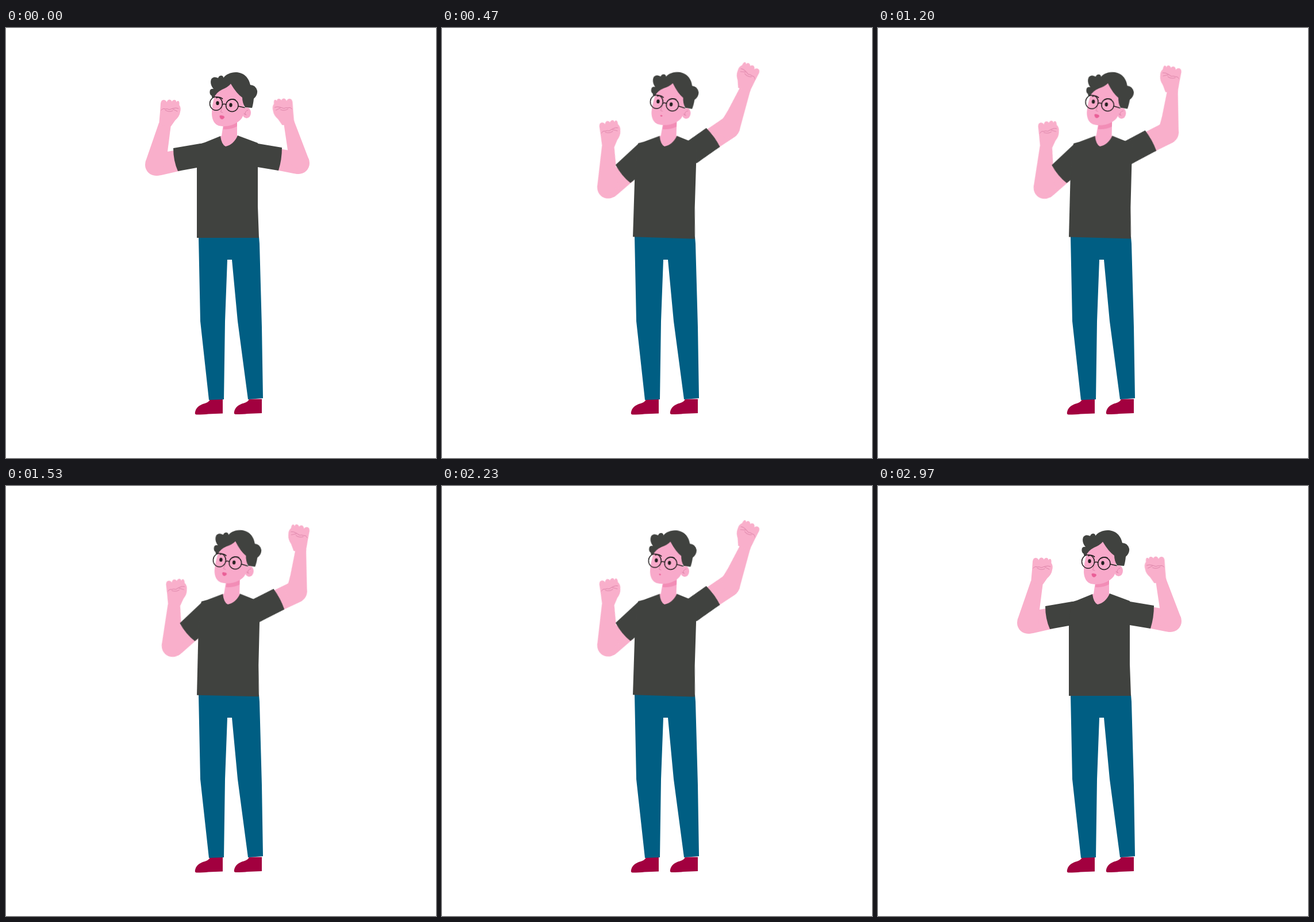
Write an HTML page that moves like this. It is 748 by 748 pixels and loops after 3000 ms.

```html
<!DOCTYPE html>
<html lang="en">
<head>
<meta charset="utf-8">
<title>Cheering man</title>
<style>
  html, body { margin: 0; width: 100%; height: 100%; overflow: hidden; background: #fff; }
  svg { display: block; width: 100vw; height: 100vh; }

  .skin { fill: #f9afcb; }
  .face { fill: #f8a9ca; }
  .dark { fill: #40423f; }
  .crease { fill: none; stroke: #dd84a9; stroke-width: 1; stroke-linecap: round; }
  .ink { fill: none; stroke: #231f20; stroke-width: 1.5; stroke-linecap: round; }

  .move { animation: 3s ease-in-out infinite; }
  #torso { transform-origin: 386px 365px; animation-name: torso; }
  #head { transform-origin: 388px 180px; animation-name: head; }
  #armL { transform-origin: 354.7px 201.5px; animation-name: armL; }
  #foreL { transform-origin: 261px 238px; animation-name: foreL; }
  #sleeveL { animation-name: sleeveL; }
  #armR { transform-origin: 428.3px 215.7px; animation-name: armR; }
  #foreR { transform-origin: 509px 235px; animation-name: foreR; }
  #handR { transform-origin: 492px 163px; animation-name: handR; }
  #mouth { transform-origin: 375.5px 155px; animation: talk .3s -8ms ease-in-out infinite; }

  @keyframes torso {
    0%, 98.5%, 100% { transform: rotate(0deg); }
    16%, 29% { transform: rotate(1.8deg); }
    46%, 51% { transform: rotate(1.35deg); }
    62%, 75.5% { transform: rotate(1.8deg); }
  }
  @keyframes head {
    0%, 99%, 100% { transform: none; }
    16% { transform: translate(4px, -1.5px) rotate(4.5deg); animation-timing-function: linear; }
    29% { transform: translate(3.6px, -1.4px) rotate(4.2deg); animation-timing-function: linear; }
    51% { transform: translate(2.7px, -1.2px) rotate(3.7deg); animation-timing-function: linear; }
    75.5% { transform: translate(2.4px, -.4px) rotate(2.7deg); }
  }
  @keyframes armL {
    0%, 98.5%, 100% { transform: rotate(0deg); }
    16%, 29% { transform: rotate(-28deg); }
    46%, 51% { transform: rotate(-28.6deg); }
    62%, 75.5% { transform: rotate(-28deg); }
  }
  @keyframes foreL {
    0%, 98.5%, 100% { transform: rotate(0deg); }
    16%, 19% { transform: rotate(15.5deg); }
    29%, 50.3% { transform: rotate(18.2deg); }
    62%, 75.5% { transform: rotate(15.5deg); }
  }
  /* the cloth over the shoulder stretches as the arm drops */
  @keyframes sleeveL {
    0%, 98.5%, 100% { d: path("M291 209L338 201 350 205V240L332 243 299 249Q291 231 291 209Z"); }
    16%, 75.5% { d: path("M291 209L342 195.6 352 199V240L332 243 299 249Q291 231 291 209Z"); }
  }
  @keyframes armR {
    0%, 98.5%, 100% { transform: rotate(0deg); }
    16%, 19% { transform: rotate(-44.6deg); }
    29% { transform: rotate(-42deg); animation-timing-function: ease-out; }
    47%, 51% { transform: rotate(-36.3deg); }
    62%, 75.5% { transform: rotate(-44.6deg); }
  }
  @keyframes foreR {
    0%, 98.5%, 100% { transform: rotate(0deg); }
    16%, 19% { transform: rotate(80.8deg); }
    29% { transform: rotate(63.4deg); animation-timing-function: ease-out; }
    47%, 50.3% { transform: rotate(55.8deg); }
    62%, 75.5% { transform: rotate(80.8deg); }
  }
  @keyframes handR {
    0%, 98.5%, 100% { transform: rotate(0deg); }
    16%, 75.5% { transform: rotate(-5deg); }
  }
  @keyframes talk {
    0%, 100% { transform: scale(1.05); }
    50% { transform: scale(.4); }
  }
</style>
</head>
<body>
<svg viewBox="0 0 748 748">
  <defs>
    <g id="fist">
      <path class="skin" d="M266 169L268 146 269 131Q270 125 274 125 278 125 279.5 129 281 124.5 284.5 124.5 288 125 288.5 128 290 125 293 125 296 125 296.5 129 298 126 300 127 302 128 301.5 134 305 139 303 146 302 154 294 161L287 171Z"/>
      <path class="crease" d="M270 143Q273 139 277 141 281 140 284 142L290 140Q296 138 300 140M277 143Q284 147 290 144M290 141L298 145"/>
    </g>
    <path id="shoe" fill="#a2003f" d="M355 646H377V670.5L352 671.5Q345 672.5 331 672.5 328 672 329 668 331 657 346 653 353 651 355 646Z"/>
  </defs>

  <use href="#shoe"/>
  <use href="#shoe" x="68" y="-.5"/>
  <path fill="#005e83" d="M335 363H440L441 375 445 520 447 644 421 646 403 510 393 403H385L381 510 379 646 353 647 338 510Z"/>

  <g id="armL" class="move">
    <path class="skin" d="M305 211L281 215 261 219 261 257Q264 257 270 256L305 248Z"/>
    <g id="foreL" class="move">
      <circle class="skin" cx="261" cy="238" r="19"/>
      <path class="skin" d="M242.5 233L266 165 287 168 281 215 278 238 261 250Z"/>
      <use href="#fist"/>
    </g>
    <path id="sleeveL" class="dark move" d="M291 209L338 201 350 205V240L332 243 299 249Q291 231 291 209Z"/>
  </g>

  <g id="armR" class="move">
    <path class="skin" d="M470 209L490 212.5 509 216V254Q505 254 500 253L470 247Z"/>
    <g id="foreR" class="move">
      <circle class="skin" cx="509" cy="235" r="19"/>
      <path class="skin" d="M527.3 230L500.5 160 483 165 490 212 492 235 509 247Z"/>
      <g id="handR" class="move">
        <use href="#fist" transform="translate(767.5 -2) scale(-1 1)"/>
      </g>
    </g>
    <path class="dark" d="M480 208L438 201 425 205V240L438 242 474 248Q480 229 480 208Z"/>
  </g>

  <g id="torso" class="move">
    <path class="dark" d="M373 188L346 199 336 202 332 242V365H440L438 310V200L403 187Z"/>
    <path class="face" d="M379 160L375 188H373Q375 203 382 206 396 203 403 187H402V155Z"/>
    <path fill="#f28db6" d="M379 168L402 163V171Q392 177 378 176Z"/>
  </g>

  <g id="head" class="move">
    <path class="face" d="M391 95Q372 104 363 118 358 134 358 150 359 166 370 170 388 174 404 163 412 157 413 150L416 120Z"/>
    <path class="dark" d="M391 97Q386 103 376 107 366 112 362 121 357 122 358 118 353 115 355 108 357 105 361 106 354 98 357 89 361 83 369 87 371 82 376 83 379 85 378 87C388 73 419 71 425 99Q434 99 437 109 438 117 431 123 430 133 428 139L416 138Q411 130 411 121 401 114 391 97Z"/>
    <ellipse class="face" cx="418.5" cy="147.5" rx="7.5" ry="9.5"/>
    <path class="crease" d="M421 143Q415 144 416 151M414 149L418 151M376 138L373.5 146 377 147"/>
    <g class="ink">
      <ellipse cx="365.5" cy="131.5" rx="11" ry="11.7"/>
      <circle cx="393.3" cy="134.7" r="10.7"/>
      <path d="M376.5 133Q380 131.5 382.6 133.5M404 136L415 138.5"/>
      <path stroke-width="1.7" d="M366 121.5Q371 118.5 376.5 123M387 126Q393 122.5 399 125"/>
    </g>
    <g fill="#231f20">
      <ellipse cx="368" cy="130.7" rx="2.7" ry="3.4"/>
      <ellipse cx="391" cy="134" rx="2.7" ry="3.4"/>
    </g>
    <path id="mouth" fill="#ea5f97" d="M371.5 153Q374 151 376 152.5 379 152 380 155 378 159 375 158.5 372 158 371.5 153Z"/>
  </g>
</svg>
</body>
</html>
```
